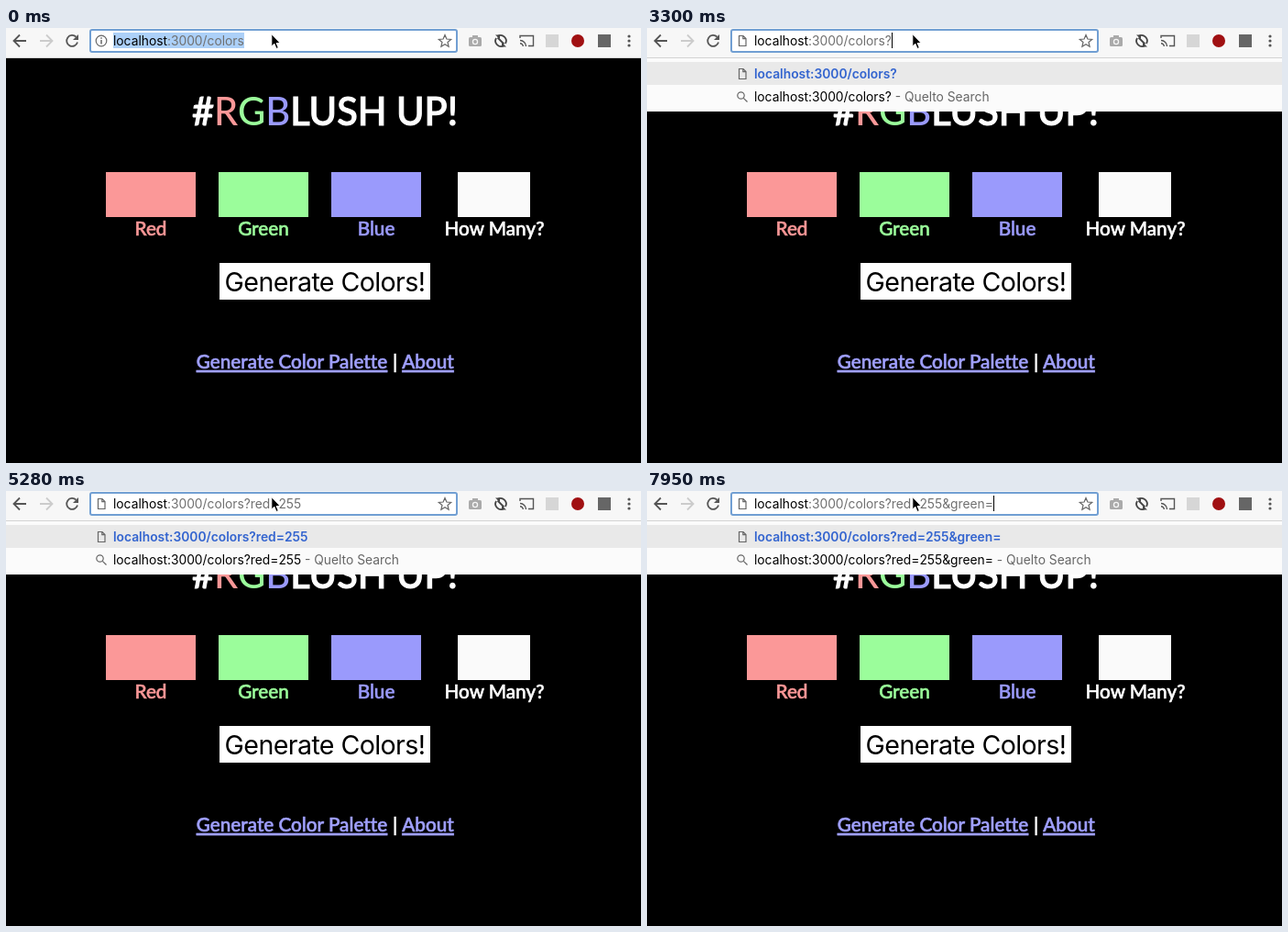
Animation, 693 px wide and 474 px high, one loop 8000 ms. Source, as an HTML page:

```html
<!DOCTYPE html>
<html lang="en">
<head>
<meta charset="utf-8">
<style>
  html, body { margin: 0; width: 100%; height: 100%; overflow: hidden; background: #000; }
  svg { display: block; }
  text { white-space: pre; }
  .ui { font: 13.8px Inter, sans-serif; }
  .page { font: 500 20.7px Lato, sans-serif; text-anchor: middle; font-variant-ligatures: none; }
  .page text { paint-order: stroke; stroke-width: .6px; }
  .page .title { font-size: 41.5px; stroke-width: 1.1px; }
  .page .button { font: 28.6px Inter, sans-serif; letter-spacing: -.6px; }
  .link { text-decoration: underline 1.6px; }
  .line { fill: none; stroke: #555; stroke-width: 1.8; }
  .thin { fill: none; stroke: #666; stroke-width: 1.2; }
</style>
</head>
<body>
<svg width="693" height="474" viewBox="0 0 693 474">
  <rect width="693" height="474"/>

  <g class="page" fill="#fff">
    <text class="title" x="348" y="105.5" stroke="#fff">#<tspan fill="#fb9898" stroke="none">R</tspan><tspan fill="#9bfd9b" stroke="none">G</tspan><tspan fill="#9a9afc" stroke="none">B</tspan>LUSH UP!</text>
    <g id="swatches"></g>
    <rect x="233" y="256" width="230" height="40"/>
    <text class="button" x="348" y="287" fill="#000">Generate Colors!</text>
    <text class="link" x="312" y="371" fill="#a0a0ff" stroke="#a0a0ff">Generate Color Palette</text>
    <text x="424.5" y="371" stroke="#fff">|</text>
    <text class="link" x="460.5" y="371" fill="#a0a0ff" stroke="#a0a0ff">About</text>
  </g>

  <g id="dropdown" class="ui">
    <rect y="32" width="693" height="59" fill="#fbfbfb"/>
    <rect y="37" width="693" height="25" fill="#e9e9e9"/>
    <use href="#file" y="36"/>
    <text id="match" x="117" y="55" font-weight="600" fill="#3364cf"></text>
    <g class="thin"><circle cx="102.5" cy="73.5" r="3.7"/><path d="M105.3 76.3L109.5 80.5"/></g>
    <text x="117" y="80"><tspan id="query"></tspan><tspan fill="#666"> - Quelto Search</tspan></text>
  </g>

  <rect width="693" height="32" fill="#f7f7f7"/>
  <rect y="32" width="693" height="1" fill="#d4d4d4"/>
  <rect x="92" y="2" width="400" height="24" rx="2" fill="#fff" stroke="#719fd3" stroke-width="2"/>

  <g class="line">
    <path d="M22 14H9M15 7.5L8.5 14L15 20.5"/>
    <path d="M37 14H50M44 7.5L50.5 14L44 20.5" stroke="#ccc"/>
    <path d="M76.500 9.700A6 6 0 1 0 78 15.500"/>
    <path d="M79 7V13H73Z" fill="#555" stroke="none"/>
  </g>

  <g id="info" class="thin"><circle cx="104" cy="14" r="5.8"/><path d="M104 13V17.500M104 10.300V11.700" stroke-width="1.5"/></g>
  <path id="file" class="thin" d="M100.500 8.500H105L108 11.500V19.500H100.500ZM104.800 8.500V11.700H108"/>
  <rect id="selection" x="117" y="5" width="143" height="17" fill="#acd0f8"/>
  <g class="ui">
    <text id="url" x="117" y="19">localhost<tspan id="path" fill="#707070"></tspan></text>
  </g>
  <rect id="caret" y="5" width="1" height="17"/>
  <path class="thin" d="M479 7.500L480.900 12L485.700 12.400L482 15.500L483.100 20.200L479 17.700L474.900 20.200L476 15.500L472.300 12.400L477.100 12Z"/>

  <g fill="#aaa"><rect x="505" y="10" width="14" height="10" rx="1.5"/><rect x="509" y="8" width="6" height="3"/><circle cx="512" cy="15" r="3.2" fill="#f7f7f7"/><circle cx="512" cy="15" r="1.9"/></g>
  <g class="line">
    <path d="M536.500 9A6 6 0 0 1 545 17M543.500 19A6 6 0 0 1 535 11M536.500 10.500L543.500 17.500" stroke="#444"/>
    <path d="M534 7.500H539V12ZM546 20.500H541V16Z" fill="#444" stroke="none"/>
    <path d="M561 11V8.500H575.500V19.500H570M561 13.500A6.500 6.500 0 0 1 567.500 20M561 16.700A3.300 3.300 0 0 1 564.300 20" stroke-width="1.4"/>
  </g>
  <rect x="589" y="7" width="14" height="14" fill="#d6d6d6"/>
  <circle cx="624" cy="14" r="7" fill="#a01012"/>
  <rect x="646" y="7" width="14" height="14" fill="#666"/>
  <g fill="#555"><circle cx="680" cy="9" r="1.6"/><circle cx="680" cy="14" r="1.6"/><circle cx="680" cy="19" r="1.6"/></g>

  <path d="M289.800 6.500V20L292.800 17.200L295 22.500L297.300 21.500L295.100 16.500H299.200Z" stroke="#fff" stroke-width="1"/>
</svg>
<script>
const $ = id => document.getElementById(id);
const LOOP = 8000, DESELECT = 1020;
const TYPED = '?red=255&green=';
const KEY_TIMES = [2190, 3530, 3620, 3860, 4010, 4210, 4510, 4710, 6530, 6920, 7210, 7320, 7500, 7590, 7950];
const CARET_OFF = [[0, DESELECT], [1710, 2190], [2760, 3300], [5280, 5850], [6390, 6530]];

// label, label centre, box left, box width, box colour, label colour
const SWATCHES = [
  ['Red', 158, 109, 98, '#fb9898', '#fb9898'],
  ['Green', 281, 232, 98, '#9bfd9b', '#9bfd9b'],
  ['Blue', 404, 355, 98, '#9a9afc', '#9a9afc'],
  ['How Many?', 533, 493, 79, '#fafafa', '#fff'],
];
$('swatches').innerHTML = SWATCHES.map(([label, mid, x, w, box, ink]) =>
  `<rect x="${x}" y="157" width="${w}" height="49" fill="${box}"/>
   <text x="${mid}" y="226" fill="${ink}" stroke="${ink}">${label}</text>`).join('');

const show = (id, on) => $(id).setAttribute('visibility', on ? 'visible' : 'hidden');

function draw(now) {
  const t = now % LOOP;
  const count = KEY_TIMES.filter(k => k <= t).length;
  const path = ':3000/colors' + TYPED.slice(0, count);

  $('path').textContent = path;
  $('match').textContent = $('query').textContent = 'localhost' + path;
  $('caret').setAttribute('x', Math.round(117 + $('url').getComputedTextLength()));

  show('selection', t < DESELECT);
  show('caret', !CARET_OFF.some(([from, to]) => t >= from && t < to));
  show('info', !count);
  // The dropdown reuses this icon, so the address bar copy stays in step with it
  show('file', count);
  $('dropdown').style.display = count ? '' : 'none';
  requestAnimationFrame(draw);
}
requestAnimationFrame(draw);
</script>
</body>
</html>
```
